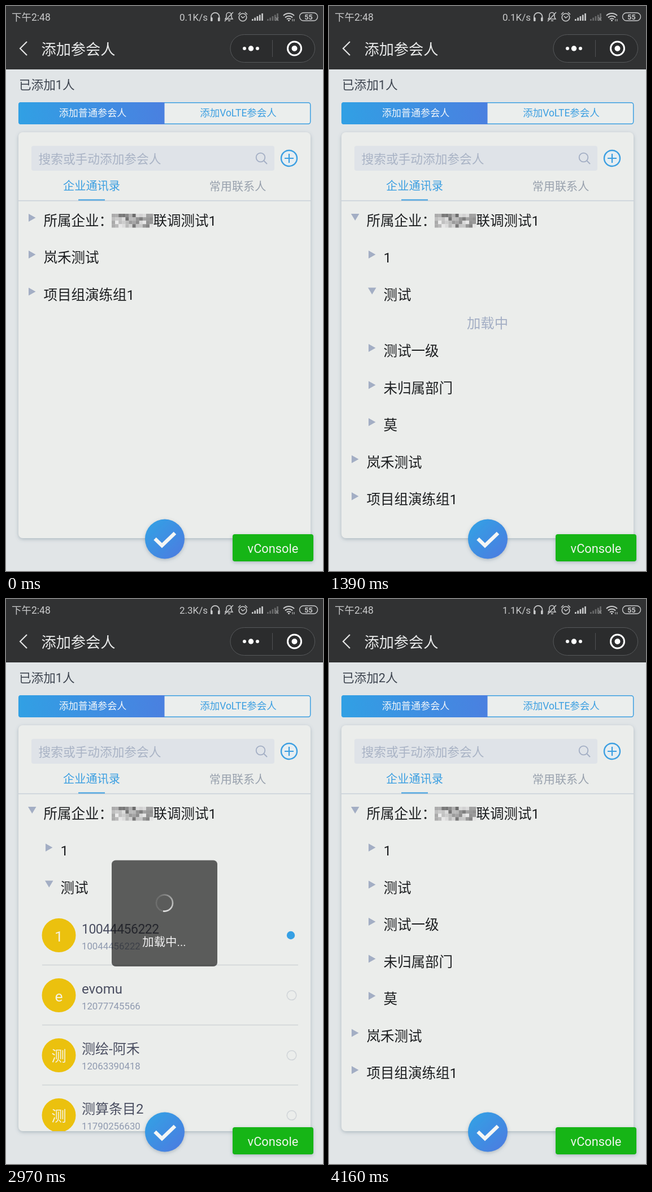
Write an HTML page that moves like this. It is 561 by 998 pixels and loops after 4.36 s.

```html
<!DOCTYPE html>
<html lang="zh-CN">
<head>
<meta charset="utf-8">
<title>添加参会人</title>
<style>
html, body { margin: 0; width: 100%; height: 100%; overflow: hidden; background: #e1e5e7; }
svg { display: block; width: 100vw; height: 100vh; }
text { font-family: Roboto, "Noto Sans CJK SC", "Noto Sans CJK", "Noto Sans CJK JP", sans-serif; }
</style>
</head>
<body>
<svg id="stage" viewBox="0 0 561 998" xmlns="http://www.w3.org/2000/svg"></svg>
<script>
const LOOP = 4360;
const BLUE = '#3c9fe1', MUTED = '#a3aec4', INK = '#1c1e20';

// cy is the optical middle of the line
const text = (x, cy, size, fill, str, extra = '') =>
  `<text x="${x}" y="${cy + size * 0.37}" font-size="${size}" fill="${fill}" ${extra}>${str}</text>`;
const MID = 'text-anchor="middle"';
const rect = (x, y, w, h, r, fill, extra = '') =>
  `<rect x="${x}" y="${y}" width="${w}" height="${h}" rx="${r}" fill="${fill}" ${extra}/>`;
const disc = (x, y, r, fill, extra = '') =>
  `<circle cx="${x}" cy="${y}" r="${r}" fill="${fill}" ${extra}/>`;
const line = (d, stroke, width, extra = '') =>
  `<path d="${d}" fill="none" stroke="${stroke}" stroke-width="${width}" ${extra}/>`;
const group = (id, body) => `<g id="${id}">${body}</g>`;
const range = (n, fn) => Array.from({ length: n }, (_, i) => fn(i)).join('');

const defs = `<defs>
  <linearGradient id="seg"><stop stop-color="#31a0e4"/><stop offset="1" stop-color="#4a80e0"/></linearGradient>
  <linearGradient id="ok" x2="1" y2="1"><stop stop-color="#31a4e5"/><stop offset="1" stop-color="#4d79e0"/></linearGradient>
  <filter id="soft" x="-20%" y="-20%" width="140%" height="140%">
    <feDropShadow dx="0" dy="2" stdDeviation="3" flood-color="#5d7486" flood-opacity=".4"/></filter>
  <clipPath id="card"><rect x="22" y="345" width="517" height="595" rx="7"/></clipPath>
</defs>`;

function bars(x, fill, count) {
  return range(5, i => rect(x + i * 4.3, 23 - i * 2.5, 2.7, 3 + i * 2.5, 0.5, i < count ? fill : '#68696a'));
}

function statusBar() {
  const c = '#c9cacb';
  return text(10, 20, 17.5, c, '下午2:48') +
    text(357, 20, 17, c, '', 'id="speed" text-anchor="end"') +
    line('M363 22V19a7.2 7.2 0 0 1 14.4 0V22', c, 1.7) +
    rect(362, 20, 3.6, 7, 1.5, c) + rect(375, 20, 3.6, 7, 1.5, c) +
    line('M388 23h13l-2-3v-4a4.5 4.5 0 0 0-9 0v4zM393 26h4M402 11L387 27', c, 1.5) +
    disc(419, 20, 6.8, 'none', `stroke="${c}" stroke-width="1.6"`) +
    line('M416 18l3 3 4-3M411 15l4-4M427 15l-4-4', c, 1.5) +
    bars(435, c, 5) + bars(462, '#68696a', 5) +
    line('M477 20l5 6M482 20l-5 6', '#8b8c8d', 1.3) +
    line('M491 17a13.5 13.5 0 0 1 19 0M494 20.5a9 9 0 0 1 13 0M497 23.5a5 5 0 0 1 7 0', c, 2) +
    disc(500.5, 25.5, 1.5, c) + line('M507 23v4M510 23v4', c, 1) +
    rect(519.5, 12, 32, 14, 7, 'none', `stroke="${c}" stroke-width="1.4"`) +
    text(535.5, 19, 12.5, c, '55', MID + ' font-weight="700"');
}

function header() {
  return rect(0, 0, 561, 112, 0, '#313233') + statusBar() +
    line('M37 63L25 75L37 87', '#e4e5e5', 2.2) +
    text(62.5, 76, 26.2, '#e9eaea', '添加参会人') +
    rect(397, 50.5, 149.5, 49, 24.5, '#2b2c2d', 'stroke="#57595b"') +
    line('M471.5 60V90', '#505254', 1) +
    disc(422, 75, 3, '#fff') + disc(433.5, 75, 4.7, '#fff') + disc(445, 75, 3, '#fff') +
    disc(510.5, 75, 12, 'none', 'stroke="#fff" stroke-width="3"') + disc(510.5, 75, 5, '#fff');
}

function panel() {
  return text(23, 139, 21.6, '#3d444f', '', 'id="count"') +
    rect(22.7, 170.7, 516, 37.6, 4, '#ebeeed', `stroke="${BLUE}" stroke-width="1.5"`) +
    '<path d="M26 170H280.500V209H26a4 4 0 0 1-4-4V174a4 4 0 0 1 4-4z" fill="url(#seg)"/>' +
    text(153.5, 189, 17.1, '#f3f7fa', '添加普通参会人', MID) +
    text(411, 189, 17.5, BLUE, '添加VoLTE参会人', MID) +
    rect(22, 223, 517, 717, 8, '#ebedeb', 'filter="url(#soft)"') +
    rect(45, 247, 430, 44, 4, '#dfe3e8') +
    text(57.5, 270, 21.7, '#a9b3c5', '搜索或手动添加参会人') +
    disc(450.5, 267.5, 7.8, 'none', `stroke="${MUTED}" stroke-width="1.8"`) +
    line('M456 273L462 279', MUTED, 1.8) +
    disc(501, 269, 14, '#e6eef2', `stroke="${BLUE}" stroke-width="2.4"`) +
    line('M493 269H509M501 261V277', BLUE, 2.2) +
    text(151.5, 318, 20.2, BLUE, '企业通讯录', MID) +
    text(410, 319, 20.1, '#98a1ad', '常用联系人', MID) +
    line('M22 344H539', '#c8d2d9', 1.7) + line('M128 342.500H175', BLUE, 2);
}

const arrow = (x, cy, open) => open
  ? `<path d="M${x - 1} ${cy - 12}h14.500l-7.250 12z" fill="${MUTED}"/>`
  : `<path d="M${x} ${cy - 12}l12.500 7l-12.500 7z" fill="${MUTED}"/>`;
const row = (level, cy, label, open) =>
  arrow(40 + level * 30, cy, open) + text(66.5 + level * 30, cy, 24.5, INK, label);

// blurred-out company name as a patch of grey cells
function mosaic() {
  return range(48, i => {
    const col = i % 12, line = Math.floor(i / 12);
    const noise = Math.abs(Math.sin(i * 12.9898 + 4.1) * 43758.5453) % 1;
    const dark = line === 0 && col < 4 || col > 3 && col < 8 ? 0.3 : 0.65;
    const v = Math.round(70 + 165 * Math.min(1, dark * 0.5 + noise * 0.75));
    return rect(187 + col * 6.1, 367 + line * 6.1, 6.2, 6.2, 0, `rgb(${v},${v},${v})`);
  });
}

const root = open => row(0, 379, '所属企业：', open) + mosaic() + text(260.5, 379, 24.5, INK, '联调测试1');
const tail = y => row(0, y, '岚禾测试') + row(0, y + 65.5, '项目组演练组1');
const lower = y => ['测试一级', '未归属部门', '莫'].map((s, i) => row(1, y + i * 65.5, s)).join('') + tail(y + 196.5);

const people = [
  ['1', '10044456222', '10044456222'],
  ['e', 'evomu', '12077745566'],
  ['测', '测绘-阿禾', '12063390418'],
  ['测', '测算条目2', '11790256630'],
];
function person([mark, name, phone], i) {
  const y = 594 + i * 106;
  const tight = /^\d+$/.test(name) ? 'letter-spacing="-.5"' : '';
  return disc(93.5, y, 30, '#ebc10e') + text(93.5, y + 1, 26.5, '#f5f2e2', mark, MID) +
    text(134, y - 12, tight ? 23 : 24, '#4a4e61', name, tight) +
    text(134, y + 18.5, 16.8, '#8f9ab0', phone) +
    disc(505.5, y, 8.3, 'none', `stroke="#d0d4d8" stroke-width="1.5" ${i ? '' : 'id="empty"'}`) +
    line(`M64 ${y + 52.5}H517`, '#d0d4d6', 1.6);
}

const views = {
  closed: root(false) + tail(444),
  open: root(true) + row(1, 444, '1') + row(1, 509.5, '测试') + lower(575),
  wait: root(true) + row(1, 444, '1') + row(1, 509.5, '测试', true) +
    text(280.5, 560, 24.4, MUTED, '加载中', MID) + lower(609),
  people: root(true) + row(1, 444, '1') + row(1, 509.5, '测试', true) + people.map(person).join('') +
    group('picked', disc(504, 594, 7.2, '#36a0e4')),
};

function buttons() {
  return disc(281, 941.5, 35, 'url(#ok)', 'filter="url(#soft)"') +
    line('M263.500 941L276 953L299 931', '#f4f6f5', 6.5) +
    rect(401, 933, 143, 48, 4, '#13b513', 'filter="url(#soft)"') +
    text(472.5, 958, 21.8, '#f0f5ee', 'vConsole', MID);
}

function toast() {
  const ring = range(30, i => {
    const p = a => `${14.5 * Math.cos(a)} ${14.5 * Math.sin(a)}`;
    const a = -i * Math.PI / 15, b = a - Math.PI / 15 - 0.02;
    const glow = Math.max(0.12, 0.95 - i * 0.045);
    return line(`M${p(a)}A14.5 14.5 0 0 0 ${p(b)}`, '#f2f2f2', 2.6, `opacity="${glow}"`);
  });
  return rect(187, 461.5, 187, 187.5, 7, 'rgba(17,17,17,.66)') + group('ring', ring) +
    text(280, 605.5, 20.4, '#f2f2f2', '加载中...', MID);
}

document.getElementById('stage').innerHTML = defs + rect(0, 0, 561, 998, 0, '#e1e5e7') +
  panel() +
  `<g clip-path="url(#card)">${Object.entries(views).map(([id, body]) => group(id, body)).join('')}` +
  group('scroll', rect(533.5, 346, 5.5, 238, 0, '#808080', 'opacity=".45"')) + '</g>' +
  buttons() + group('toast', toast()) + header();

const $ = id => document.getElementById(id);
const show = (id, on) => $(id).setAttribute('display', on ? 'inline' : 'none');

// value of the last step that has begun
const pick = (t, steps) => steps.reduce((v, [at, next]) => t >= at ? next : v, null);

function draw(t) {
  const view = pick(t, [[0, 'closed'], [790, 'open'], [1390, 'wait'], [1980, 'people'], [3760, 'open']]);
  for (const id in views) show(id, id === view);
  show('scroll', t >= 1980 && t < 2380);
  show('picked', t >= 2570);
  show('empty', t < 2570);
  show('toast', t >= 2570 && t < 3170);
  $('ring').setAttribute('transform', `translate(280.5 537) rotate(${pick(t, [[0, -44], [2970, 100]])})`);
  $('speed').textContent = pick(t, [[0, '0.1'], [2570, '2.3'], [4160, '1.1']]) + 'K/s';
  $('count').textContent = `已添加${t < 3170 ? 1 : 2}人`;
}

const start = performance.now();
function tick() {
  draw((performance.now() - start) % LOOP);
  requestAnimationFrame(tick);
}
tick();
</script>
</body>
</html>
```
